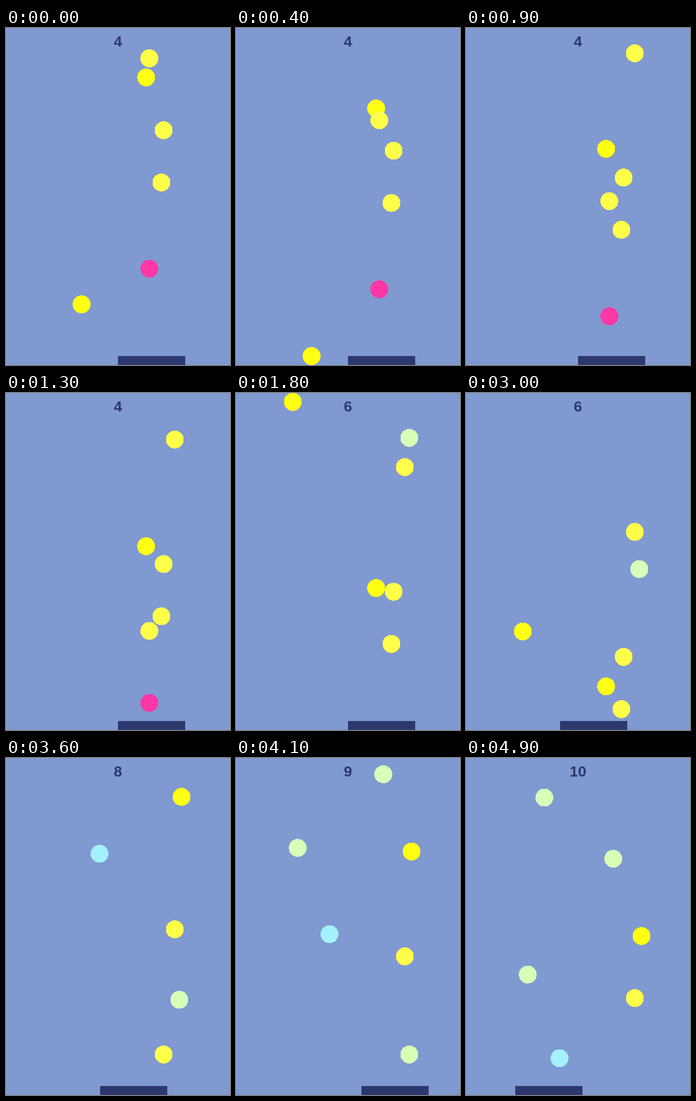
Animation of 400x600 px, one loop 5 s. Source, as an HTML page:

```html
<!DOCTYPE html>
<html lang="en">
<head>
<meta charset="utf-8">
<title>Catch the balls</title>
<style>
  html, body { margin: 0; width: 100%; height: 100%; overflow: hidden; background: #8099d1; }
  svg { display: block; width: 400px; height: 600px; }
  circle { shape-rendering: crispEdges; }
  text { font: bold 26.67px "Liberation Sans", Arial, sans-serif; text-anchor: middle; }
</style>
</head>
<body>
<svg viewBox="0 0 400 600">
  <rect width="400" height="600" fill="#8099d1"/>
  <text id="score" x="200" y="33" fill="#2d386f">4</text>
  <g id="balls"></g>
  <rect id="paddle" y="584" width="120" height="16" fill="#2d386f"/>
</svg>
<script>
const STEP = 100, STEPS = 50, RADIUS = 16, SPAWN_Y = 15, CATCH_Y = 568, FIRST_SCORE = 4;
const LIGHT = '#ffff4a', BRIGHT = '#ffff12', PINK = '#ff38a6', GREEN = '#d6ffb8', CYAN = '#a3f1ff';

// Game ticks elapsed at each step; the frame rate wavers around six per step
const clock = [[0, 0], [4, 23], [13, 77], [23, 139], [30, 181], [41, 248], [49, 295]];
const paddlePath = [[19, 200], [24, 280], [30, 168], [36, 168], [42, 240], [49, 88]];

const byId = id => document.getElementById(id);
const score = byId('score'), paddle = byId('paddle');

// Every ball falls at a constant speed per tick; y is its height at tick 0
function makeBall(x, y, speed, color, missed = false) {
  const node = document.createElementNS('http://www.w3.org/2000/svg', 'circle');
  node.setAttribute('cx', x);
  node.setAttribute('r', RADIUS);
  node.setAttribute('fill', color);
  byId('balls').append(node);
  return { node, y, speed, missed };
}

const balls = [
  makeBall(135, 492, 4, BRIGHT, true),
  makeBall(256, 428.5, 1.6, PINK),
  makeBall(277.5, 275, 1.59, LIGHT),
  makeBall(281.5, 182, 1.59, LIGHT),
  makeBall(250.3, 88, 2.4, BRIGHT),
  makeBall(256, 54, 4.8, LIGHT),
  makeBall(301.5, -38.7, 1.58, LIGHT),
  makeBall(309.5, -265.7, 3.2, GREEN),
  makeBall(101.5, -589, 5.6, BRIGHT, true),
  makeBall(167, -852, 4.7, CYAN),
  makeBall(313.5, -627, 3.2, BRIGHT),
  makeBall(110.3, -1030.4, 4.8, GREEN),
  makeBall(263, -764.6, 3.2, GREEN),
  makeBall(140, -401.5, 1.6, GREEN)
];

// Linear between points, held before the first and after the last
function along(path, t) {
  const next = path.findIndex(([time]) => time >= t);
  if (next < 0) return path[path.length - 1][1];
  if (next === 0) return path[0][1];
  const [t0, v0] = path[next - 1], [t1, v1] = path[next];
  return v0 + (v1 - v0) * (t - t0) / (t1 - t0);
}

function draw(step) {
  const ticks = along(clock, step);
  let points = FIRST_SCORE;
  for (const ball of balls) {
    const y = ball.y + ball.speed * ticks;
    const caught = !ball.missed && y >= CATCH_Y;
    if (caught) points++;
    ball.node.setAttribute('cy', y);
    ball.node.setAttribute('visibility', caught || y < SPAWN_Y ? 'hidden' : 'visible');
  }
  paddle.setAttribute('x', Math.floor(along(paddlePath, step) / 8) * 8);
  score.textContent = points;
}

const start = performance.now();
function tick() {
  const time = Math.max(0, performance.now() - start);
  draw(Math.floor(time / STEP) % STEPS);
  requestAnimationFrame(tick);
}
tick();
</script>
</body>
</html>
```
